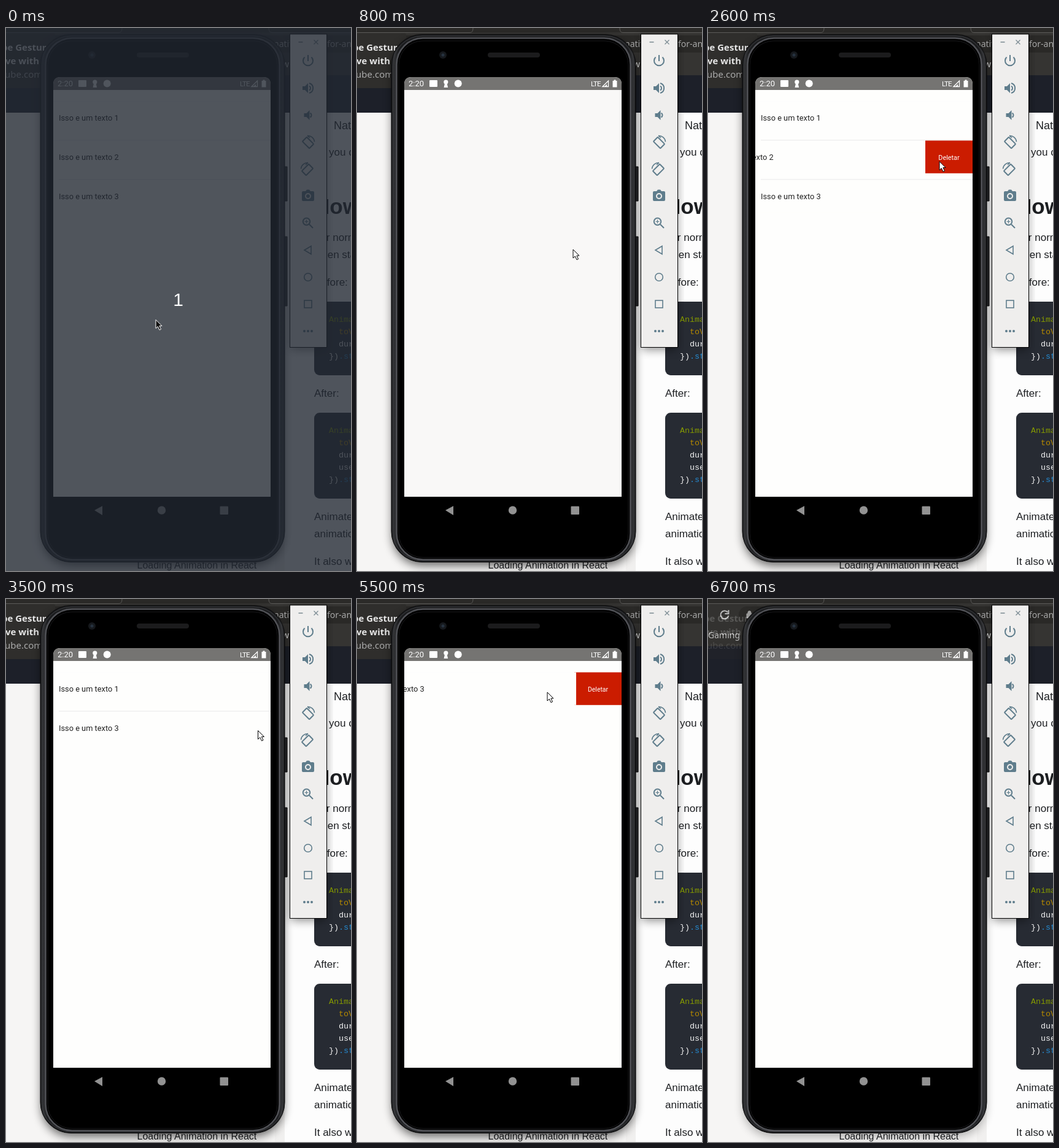
An HTML page for the animation above (6800 ms loop, 562 px wide and 885 px high).

```html
<!DOCTYPE html>
<html lang="en">
<head>
<meta charset="utf-8">
<title>Swipe to delete</title>
<style>
  html, body { margin: 0; width: 100%; height: 100%; overflow: hidden; background: #fdfdfd; }
  svg { display: block; width: 562px; height: 885px; }
  text { white-space: pre; }
  .page { font: 17px "Liberation Sans", Arial, sans-serif; fill: #1c1e21; }
  .code { font: 13.33px "Liberation Mono", monospace; fill: #f4f4f4; }
  .bar { font: 14px "Noto Sans", sans-serif; fill: #aaa; }
  .tip { font: bold 15px "Noto Sans", sans-serif; fill: #e6e6e6; }
  .app { font: 12.8px Roboto, sans-serif; fill: #222; }
  .icons { fill: none; stroke: #5f7d8c; stroke-width: 2; }
  .solid { fill: #5f7d8c; stroke: none; }
</style>
</head>
<body>
<svg viewBox="0 0 562 885">
  <defs>
    <clipPath id="screenClip"><path d="M77 764V92q0-12 12-12H419q12 0 12 12V764z"/></clipPath>
    <filter id="blur" x="-20%" y="-20%" width="140%" height="140%"><feGaussianBlur stdDeviation="8"/></filter>
    <linearGradient id="rim">
      <stop offset="0" stop-color="#151617"/><stop offset=".012" stop-color="#323336"/>
      <stop offset=".03" stop-color="#1b1c1e"/><stop offset=".97" stop-color="#1b1c1e"/>
      <stop offset=".988" stop-color="#323336"/><stop offset="1" stop-color="#151617"/>
    </linearGradient>
  </defs>

  <!-- browser and page -->
  <rect width="562" height="885" fill="#fdfdfd"/>
  <rect y="138" width="454" height="747" fill="#f6f5f4"/>
  <rect x="438" y="138" width="16" height="747" fill="#f1f0ef"/>
  <rect width="562" height="78" fill="#353432"/>
  <rect width="562" height="7" fill="#2b2a28"/>
  <path d="M0 7.5H184q5 0 5-7.5M428 0q0 7.5 5 7.5H562" fill="none" stroke="#5c5b59"/>
  <rect x="50" y="12" width="540" height="28" rx="14" fill="#2a2927"/>
  <rect y="77" width="562" height="61" fill="#1d2029"/>
  <g class="bar">
    <path d="M32 21.5A6.5 6.5 0 1 0 33.5 27M33.5 18v6h-6" fill="none" stroke="#ddd" stroke-width="2"/>
    <path d="M63 24h9v7h-9zM65 24v-2a2.5 2.5 0 0 1 5 0v2" fill="#bbb" stroke="#bbb"/>
    <text y="64" style="fill:#e4e4e4">Gaming</text>
    <text x="436" y="31">native</text><text x="523" y="31">for-anim</text>
    <text x="450" y="64" style="fill:#e4e4e4">w</text>
  </g>
  <g id="tooltip">
    <rect x="-10" y="8" width="90" height="90" rx="3" fill="#2f2e2c"/>
    <g class="tip">
      <text x="-7" y="37">pe Gesture</text><text x="-1" y="59">ve with</text>
      <text x="-2" y="81" style="font-weight:400;fill:#aaa">ube.com</text>
    </g>
  </g>
  <g class="page">
    <text x="534" y="165" style="font-size:18px">Native</text>
    <text x="526" y="208">you can</text>
    <text x="502" y="303" style="font-size:35px;font-weight:bold">How</text>
    <text x="502" y="347">For normal</text><text x="502" y="375">when starting</text>
    <text x="502" y="420">Before:</text><text x="502" y="601">After:</text>
    <text x="502" y="802">Animated</text><text x="502" y="830">animation</text>
    <text x="502" y="875">It also works</text>
    <text x="213.5" y="881" style="font-size:16px">Loading Animation in React</text>
  </g>
  <g class="code" id="code"></g>

  <!-- phone -->
  <rect id="shadow" x="58" y="18" width="394" height="858" rx="48" filter="url(#blur)"/>
  <path d="M453 226h5v56h-5zM453 340h5v113h-5z" fill="#202124" stroke="#0c0c0d"/>
  <rect x="56" y="10.5" width="398" height="860" rx="50" fill="url(#rim)" stroke="#0b0b0c"/>
  <rect x="58.5" y="13" width="393" height="855" rx="47.5" fill="none" stroke="#3c3d40"/>
  <rect x="64.5" y="16.5" width="381" height="850" rx="43" fill="#000" stroke="#515257" stroke-width="2.5"/>
  <rect x="68" y="21" width="374" height="842" rx="39" fill="#000" stroke="#1a1a1c"/>
  <circle cx="140" cy="44" r="6" fill="#16191d"/><circle cx="140" cy="44" r="2.5" fill="#26323f"/>
  <rect x="213" y="40" width="85" height="8" rx="4" fill="#1c1c1d"/>
  <path d="M144 786l13-7v15z" fill="#929292"/>
  <circle cx="253.5" cy="786" r="6.7" fill="#929292"/>
  <rect x="348.5" y="779.5" width="13.5" height="13.5" rx="1" fill="#929292"/>

  <g clip-path="url(#screenClip)">
    <rect id="screen" x="77" y="80" width="354" height="684"/>
    <g id="list"></g>
    <rect x="77" y="80" width="354" height="21" fill="#757472"/>
    <g fill="#fff">
      <text class="app" x="84" y="95" style="fill:#fff;font-size:13px">2:20</text>
      <rect x="118" y="85" width="13" height="11" rx="1"/>
      <circle cx="144.8" cy="88" r="3.6"/><path d="M143.3 89h3l1.8 8h-6.6z"/>
      <circle cx="164.7" cy="90.5" r="6"/>
      <text class="app" x="381" y="95" style="fill:#fff;font-size:11.5px;letter-spacing:-.7px">LTE</text>
      <path d="M400 95.5L409.5 86v9.5z" fill="none" stroke="#fff" stroke-width="1.3"/>
      <path d="M403 95.5l4-4v4z"/>
      <path d="M416.5 86h2v-1.5h3V86h2v10.5h-7z"/>
    </g>
  </g>

  <!-- emulator tool panel -->
  <rect x="464" y="16" width="57" height="508" filter="url(#blur)" opacity=".45"/>
  <rect x="462.5" y="10" width="60" height="510.5" fill="#efeeed" stroke="#000"/>
  <g class="icons">
    <path d="M476.5 23h7M501.5 19.5l7 7M508.5 19.5l-7 7" stroke="#7b8b93" stroke-width="1.3"/>
    <path d="M492 44v10M486.5 47.5A8 8 0 1 0 497.5 47.5"/>
    <path class="solid" d="M483 95h4l5-5v16l-5-5h-4z"/>
    <path d="M494 94.5a4 4 0 0 1 0 7M494 90a8.3 8.3 0 0 1 0 16"/>
    <path class="solid" d="M485.5 139h4l5-5v16l-5-5h-4z"/>
    <path d="M495.5 138.5a4 4 0 0 1 0 7"/>
    <g id="rotate">
      <rect x="-8" y="-5" width="16" height="10" rx="1" transform="translate(492 187) rotate(45)"/>
      <path d="M491 175.5a11 11 0 0 1 11.5 10M491 175.5l4 3.5" stroke-width="1.6"/>
    </g>
    <use href="#rotate" transform="matrix(-1 0 0 1 983 44)"/>
    <path class="solid" d="M484 266h4l2-2.5h4l2 2.5h4q2 0 2 2v12q0 2-2 2h-16q-2 0-2-2v-12q0-2 2-2z"/>
    <circle cx="492" cy="274" r="4" stroke="#efeeed"/>
    <circle cx="489.5" cy="315.5" r="5.7"/><path d="M494 320l6 6"/>
    <path d="M486.5 315.5h6M489.5 312.5v6" stroke-width="1.2"/>
    <path d="M486 362l11-6.5v13z" stroke-width="1.6"/>
    <circle cx="492" cy="406" r="6.3" stroke-width="1.6"/>
    <rect x="486" y="444" width="12" height="12" stroke-width="1.6"/>
    <g class="solid"><circle cx="486" cy="494" r="2"/><circle cx="492" cy="494" r="2"/><circle cx="498" cy="494" r="2"/></g>
  </g>

  <g id="countdown">
    <rect width="562" height="885" fill="rgb(34,40,50)" opacity=".79"/>
    <text x="280.5" y="453" text-anchor="middle" fill="#fff" style="font:30px 'Liberation Sans',Arial,sans-serif">1</text>
  </g>
  <path id="cursor" d="M.5 .5V14.5L3.8 11.5L6.5 17.2L9 16L6.4 10.5H10.5z"/>
</svg>
<script>
const LOOP = 6800, STEP = 100, ROW_PITCH = 64, ACTION_WIDTH = 77;
const $ = id => document.getElementById(id);

const codeBlock = (y, height, lines) => {
  const text = lines.map(([x, line, color], i) =>
    `<text x="${x}" y="${y + 33 + i * 20}" style="fill:${color}">${line}</text>`).join('');
  return `<rect x="502" y="${y}" width="80" height="${height}" rx="9" fill="#272b33"/>${text}`;
};
const head = [[526, 'Animated', '#859900'], [542, 'toValue', '#b58900'], [542, 'duration', '#f4f4f4']];
const tail = [526, '})<tspan fill="#268bd2">.start</tspan>', '#f4f4f4'];
$('code').innerHTML = codeBlock(446, 120, [...head, tail]) +
  codeBlock(627, 140, [...head, [542, 'useNative', '#f4f4f4'], tail]);

// Keyframes are [time, value, ...]; values are interpolated linearly.
function track(keys, t) {
  const next = keys.findIndex(k => k[0] > t);
  if (next < 0) return keys[keys.length - 1].slice(1);
  if (next === 0) return keys[0].slice(1);
  const a = keys[next - 1], b = keys[next], p = (t - a[0]) / (b[0] - a[0]);
  return a.slice(1).map((v, i) => v + (b[i + 1] - v) * p);
}

const pointer = [
  [0, 243.5, 475], [100, 244.5, 476.5], [400, 244.5, 476.5], [500, 268, 452], [800, 351.5, 360.5],
  [1100, 360, 309], [1200, 369, 277], [1300, 369, 277], [1400, 380, 262], [1700, 405, 212],
  [2100, 300, 210], [2600, 376.5, 217], [2700, 376.5, 217], [2800, 395, 217], [3000, 419, 220],
  [3100, 419, 220], [3500, 410, 214], [3700, 410, 214], [4000, 419, 165], [4200, 400, 166],
  [4400, 319.5, 168.5], [4800, 395, 150], [5000, 400, 152], [5100, 400, 152], [5200, 415, 153],
  [5500, 309.5, 151.5], [5800, 400, 150], [6200, 410, 140], [6500, 424, 35], [6600, 452, 7]
];
const rows = [
  { label: 'Isso e um texto 1', removed: 4900, swipe: [[4300, 0], [4400, 112], [4600, 77]] },
  { label: 'Isso e um texto 2', removed: 3300, swipe: [[1700, 0], [2100, 92], [2300, 77]] },
  { label: 'Isso e um texto 3', removed: 6000, swipe: [[5200, 0], [5500, 74], [5600, 84], [5800, 77]] }
];

function rowMarkup(row, index, count, t) {
  const y = 119.5 + index * ROW_PITCH, [offset] = track(row.swipe, t);
  const scale = Math.min(1, offset / 91);
  const action = offset > 0 ? `<rect x="${431 - ACTION_WIDTH}" y="${y}" width="78" height="53.3" fill="#cb1c00"/>
    <g transform="translate(392.5 ${y + 31.5}) scale(${scale})">
      <text class="app" text-anchor="middle" style="fill:#fff">Deletar</text></g>` : '';
  const line = index < count - 1 ? `<rect x="86" y="${y + 63}" width="345" height="1" fill="#e4e4e3"/>` : '';
  return `${action}<g transform="translate(${-offset} 0)">
    <rect x="77" y="${y}" width="354" height="53.3" fill="#fefefd"/>
    <text class="app" x="86" y="${y + 31.5}">${row.label}</text></g>${line}`;
}

function draw(t) {
  const reloading = t >= 600 && t < 1000;
  const visible = reloading ? [] : rows.filter(row => t < row.removed);
  $('screen').setAttribute('fill', reloading ? '#f9f8f7' : '#fefefd');
  $('list').innerHTML = visible.map((row, i) => rowMarkup(row, i, visible.length, t)).join('');

  const intro = t < 100;
  $('countdown').style.display = intro ? '' : 'none';
  $('tooltip').setAttribute('opacity', track([[6500, 1], [6700, .2]], t)[0]);
  $('shadow').setAttribute('opacity', track([[6500, .6], [6700, .3]], t)[0]);

  const cursor = $('cursor'), [x, y] = track(pointer, t);
  cursor.setAttribute('transform', `translate(${x} ${y})`);
  cursor.setAttribute('fill', intro ? '#111' : '#fff');
  cursor.setAttribute('stroke', intro ? '#fff' : '#000');
  cursor.style.display = t < 6700 ? '' : 'none';
}

const start = performance.now();
let shown = -1;
function tick() {
  const t = Math.floor((performance.now() - start) % LOOP / STEP) * STEP;
  if (t !== shown) draw(shown = t);
  requestAnimationFrame(tick);
}
tick();
</script>
</body>
</html>
```
